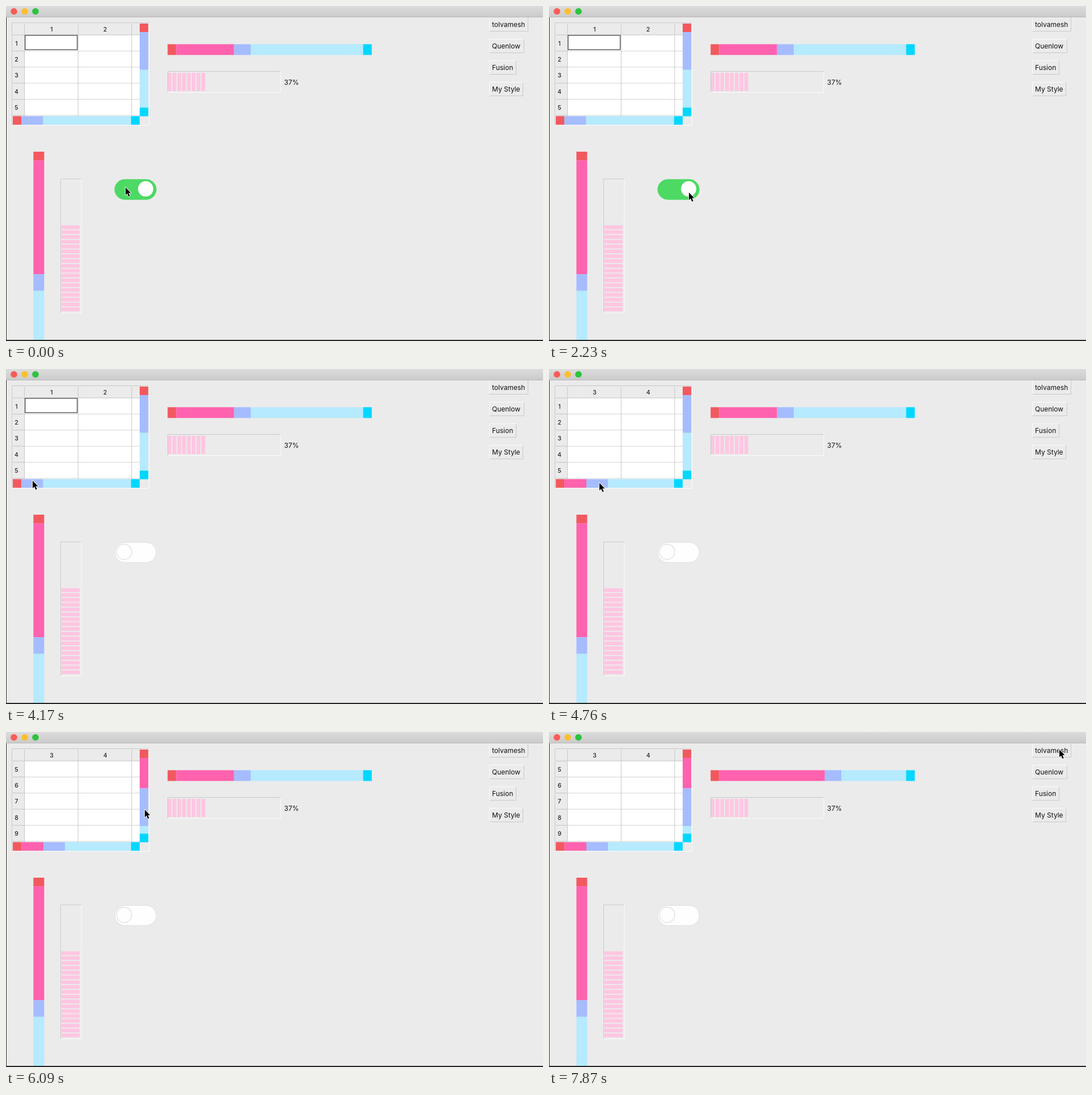
Write an HTML page that moves like this. It is 948 px wide and 591 px high and loops after 8 s.

```html
<!DOCTYPE html>
<html lang="en">
<head>
<meta charset="utf-8">
<title>Widget styles</title>
<style>
  html, body { margin: 0; width: 100%; height: 100%; overflow: hidden; background: #ebebeb; }
  svg { display: block; width: 100vw; height: 100vh; }
  text { font: 12px Inter, "Liberation Sans", sans-serif; fill: #111; }
  .head { font-size: 10.5px; font-weight: 500; text-anchor: middle; fill: #222; }
</style>
</head>
<body>
<svg id="stage" viewBox="0 0 948 591" preserveAspectRatio="none">
  <defs>
    <linearGradient id="bar" x2="0" y2="1">
      <stop stop-color="#dcdcdc"/><stop offset="1" stop-color="#cacaca"/>
    </linearGradient>
  </defs>
</svg>
<script>
const LOOP = 8000, TICK = 148.6;
const RED = '#f2595f', PINK = '#ff62ae', BLUE = '#a5bcff', PALE = '#b5eaff', CYAN = '#00d7ff';
const CHUNK = '#ffc6e2', BG = '#ebebeb', DARK = '#c9c9c9', LIGHT = '#fbfbfb';
const stage = document.getElementById('stage');

function add(tag, attrs, text) {
  const el = document.createElementNS('http://www.w3.org/2000/svg', tag);
  set(el, attrs);
  if (text) el.textContent = text;
  return stage.appendChild(el);
}
function set(el, attrs) {
  for (const k in attrs) el.setAttribute(k, attrs[k]);
}
const rect = (x, y, width, height, fill) => add('rect', { x, y, width, height, fill });
const label = (x, y, text, cls = '') => add('text', { x, y, class: cls }, text);
const line = (d, stroke, width = 1) => add('path', { d, stroke, fill: 'none', 'stroke-width': width });

// One-pixel box with separate colours for its top-left and bottom-right edges.
function bevel(x, y, w, h, topLeft, bottomRight) {
  line(`M${x + .5} ${y + h - .5}V${y + .5}H${x + w - .5}`, topLeft);
  line(`M${x + .5} ${y + h - .5}H${x + w - .5}V${y + .5}`, bottomRight);
}

// Five-part scroll bar; returns a function that moves the handle.
function scrollBar(x, y, length, thick, handle, vertical) {
  const end = 15.2, track = length - 2 * end;
  const parts = [RED, PINK, BLUE, PALE, CYAN].map(c => rect(x, y, thick, thick, c));
  return offset => {
    const sizes = [end, offset, handle, track - handle - offset, end];
    let at = vertical ? y : x;
    parts.forEach((p, i) => {
      set(p, vertical ? { y: at, height: sizes[i] } : { x: at, width: sizes[i] });
      at += sizes[i];
    });
  };
}

// Window
rect(0, 0, 948, 591, BG);
rect(0, 0, 948, 20, 'url(#bar)');
rect(0, 19, 948, 1, '#b9b9b9');
['#fc5b57', '#fdbe2f', '#2cc43e'].forEach((fill, i) =>
  add('circle', { cx: 14 + 19 * i, cy: 9.5, r: 5.8, fill }));

// Table
const ROW = 28.4, COL = 94.6;
rect(11, 30, 240, 180, BG);
rect(33, 51, 203, 143, '#fff');
for (let i = 0; i < 6; i++) {
  const y = 51 + ROW * i;
  line(`M12 ${y}H33`, '#c4c4c4');
  line(`M33 ${y}H236`, i ? '#d4d4d4' : '#c4c4c4');
}
for (let i = 0; i < 3; i++) line(`M${32.7 + COL * i} 31V194`, '#c8c8c8');
const cell = add('rect', { x: 33.7, y: 51.7, width: 92, height: 25.3, fill: '#fff', stroke: '#555', 'stroke-width': 1.4 });
const cols = [0, 1].map(i => label(80.5 + COL * i, 45, '1', 'head'));
const rows = [0, 1, 2, 3, 4].map(i => label(18.5, 69.5 + ROW * i, '1', 'head'));
const moveAcross = scrollBar(12, 194.3, 224, 15.2, 38.4, false);
const moveDown = scrollBar(236, 31, 163.5, 15.2, 66.5, true);
bevel(10, 29, 243, 182, DARK, LIGHT);

// Sliders
const moveSlider = scrollBar(285.3, 67.4, 360.4, 19, 29.4, false);
scrollBar(48.4, 257, 360.4, 19, 29.4, true)(201);

// Progress bars
for (let i = 0; i < 8; i++) rect(285.5 + 8.5 * i, 118, 6.6, 32, CHUNK);
bevel(285, 115, 200.5, 38, DARK, LIGHT);
label(491, 138.5, '37%');
for (let i = 0; i < 18; i++) rect(97.5, 387 + 8.52 * i, 32.5, 6.6, CHUNK);
bevel(96, 304.5, 37.5, 237.5, DARK, LIGHT);

// Toggle
const pill = add('rect', { x: 192, y: 306, width: 73.2, height: 35.3, rx: 17.65 });
const knob = add('circle', { cy: 322.6, r: 13.5, fill: '#fefefe', 'stroke-width': 1.3 });

// Style buttons
[['tolvamesh', 69], ['Quenlow', 62], ['Fusion', 48], ['My Style', 60]].forEach(([name, w], i) => {
  const y = 20 + 38 * i;
  if (i) bevel(853, y, w, 25, LIGHT, DARK);
  else {
    line(`M853.5 20V44.5`, LIGHT);
    line(`M853 44.5H${852.5 + w}V20`, DARK);
  }
  label(858, y + 17, name);
});

// Desktop showing at the edges
rect(0, 20, 1, 571, '#2a2a2a');
rect(0, 589, 948, 2, '#242424');

const cursor = add('path', {
  d: 'M0 0V13.4L3 10.6L5.3 15.9L7.7 14.9L5.4 9.7H9.5Z',
  stroke: '#fff', 'stroke-width': 1.8, 'stroke-linejoin': 'round', 'paint-order': 'stroke'
});

// Cursor moves: first tick, number of ticks, end point, downward bow.
const moves = [
  [1, 5, 247, 329], [22, 6, 43, 195], [28, 1, 47, 197], [29, 1, 49, 198], [30, 3, 89, 201],
  [34, 5, 243, 90], [40, 2, 245, 137], [43, 4, 440, 77], [47, 1, 487, 73], [48, 2, 515, 74],
  [50, 4, 901, 31, 48]
];

function cursorAt(tick) {
  let x = 211, y = 320;
  for (const [start, steps, toX, toY, bow = 0] of moves) {
    if (tick < start) break;
    const p = Math.min(1, (tick - start + 1) / steps);
    const e = p * p * (3 - 2 * p);
    x += (toX - x) * e;
    y += (toY - y) * e + bow * Math.sin(Math.PI * p);
  }
  return [x, y];
}

// Value of the last [tick, value] pair already reached.
const held = (tick, pairs) => pairs.reduce((v, [at, next]) => tick >= at ? next : v, 0);

function draw(ms) {
  const tick = Math.floor((ms % LOOP + 8) / TICK);
  const on = held(tick, [[0, 1], [9, 0], [15, 1], [20, 0]]);
  const col = held(tick, [[30, 1], [31, 2]]);
  const row = held(tick, [[40, 2], [41, 4]]);
  const value = held(tick, [[0, 34], [47, 40], [48, 55], [49, 62]]);

  set(pill, { fill: on ? '#4cd964' : '#fefefe', stroke: on ? '#4cd964' : '#dedede' });
  set(knob, { cx: on ? 246.5 : 208.5, stroke: on ? 'none' : '#dedede' });
  set(cell, { visibility: col || row ? 'hidden' : 'visible' });
  cols.forEach((el, i) => { el.textContent = col + i + 1; });
  rows.forEach((el, i) => { el.textContent = row + i + 1; });
  moveAcross(col * 19.4);
  moveDown(row * 13.3);
  moveSlider(value * 3.006);
  set(cursor, { transform: `translate(${cursorAt(tick)})` });
}

const begin = performance.now();
function loop() {
  draw(performance.now() - begin);
  requestAnimationFrame(loop);
}
loop();
</script>
</body>
</html>
```
